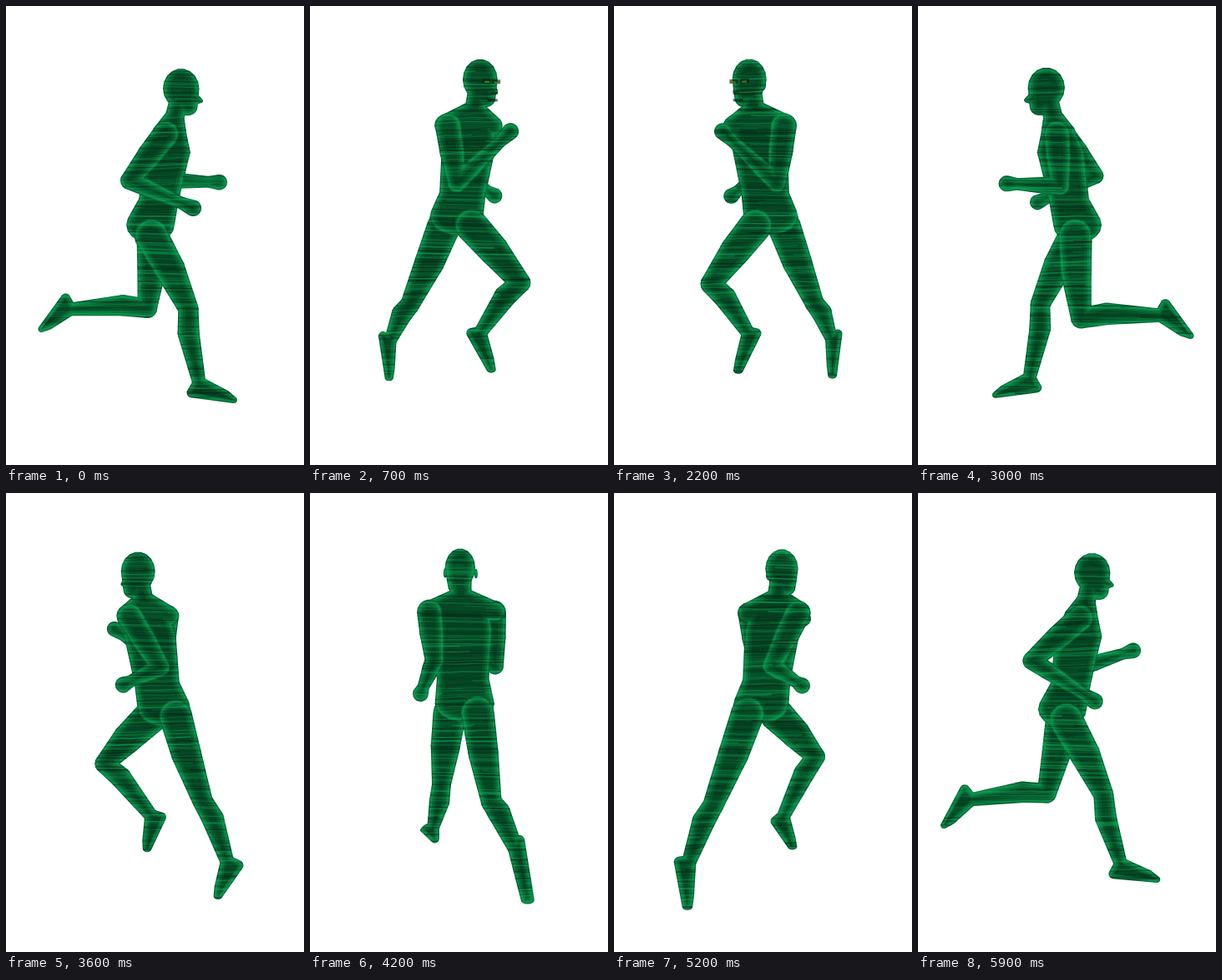
An HTML page with a canvas that plays this animation: 357 by 550 pixels, repeating every 6000 ms.

```html
<!DOCTYPE html>
<html lang="en">
<head>
<meta charset="utf-8">
<title>Runner</title>
<style>
html, body { margin: 0; width: 100%; height: 100%; overflow: hidden; background: #fff; }
canvas { display: block; width: 100%; height: 100%; }
</style>
</head>
<body>
<canvas id="stage" width="357" height="550"></canvas>
<script>
const ctx = document.getElementById('stage').getContext('2d');
const W = 357, H = 550, LOOP = 6000, STRIDE = 3000, STEP = 100;
const AXIS = 182, EYE = 270, CAMERA = 900, PITCH = 0.13;
const TAU = Math.PI * 2;
const wave = (p, peak) => Math.cos(TAU * (p - peak));
const mix = (a, b, k) => a.map((v, i) => v + (b[i] - v) * k);

// Stride phase, then forward/down places of knee, ankle and toe.
const LEG = [
  [0, 36, 90, 49, 179, 90, 199],
  [.12, 3, 96, -25, 182, 20, 205],
  [.233, -69, 95, -111, 149, -113, 197],
  [.31, -58, 98, -136, 136, -158, 184],
  [.4, -35, 94, -131, 120, -163, 162],
  [.467, -26, 95, -118, 98, -150, 128],
  [.5, -13, 98, -107, 97, -142, 121],
  [.62, 40, 80, -42, 108, -62, 142],
  [.733, 75, 54, 20, 120, 37, 160],
  [.82, 67, 68, 68, 146, 104, 170],
  [.9, 48, 88, 98, 156, 139, 170],
  [.967, 39, 90, 60, 174, 104, 194]
];
// Stride phase, then elbow and wrist.
const ARM = [
  [0, -32, -64, 26, -38],
  [.12, -6, -60, 48, -56],
  [.233, 38, -62, 70, -108],
  [.4, 28, -60, 72, -86],
  [.467, 21, -58, 67, -76],
  [.5, 11, -58, 62, -58],
  [.6, -14, -60, 38, -48],
  [.733, -47, -67, 2, -46],
  [.9, -52, -73, 3, -38],
  [.967, -48, -72, 10, -34]
];
const LAYERS = [
  [0, '#056b37'], [1.3, '#0b8d4b'], [3.5, '#077039'], [6, '#05582c'], [9, '#044824']
];

// Smooth cyclic interpolation through the rows of a key table.
function sample(keys, phase) {
  const p = phase - Math.floor(phase), n = keys.length;
  const row = j => {
    const turn = Math.floor(j / n), r = keys[j - turn * n];
    return [r[0] + turn, ...r.slice(1)];
  };
  let i = n - 1;
  while (keys[i][0] > p) i--;
  const [a, b, c, d] = [row(i - 1), row(i), row(i + 1), row(i + 2)];
  const span = c[0] - b[0], u = (p - b[0]) / span, u2 = u * u, u3 = u2 * u;
  return b.slice(1).map((v, k) => {
    const j = k + 1;
    const m0 = (c[j] - a[j]) / (c[0] - a[0]) * span;
    const m1 = (d[j] - b[j]) / (d[0] - b[0]) * span;
    return (2 * u3 - 3 * u2 + 1) * v + (u3 - 2 * u2 + u) * m0
      + (3 * u2 - 2 * u3) * c[j] + (u3 - u2) * m1;
  });
}

let cosA = 1, sinA = 0;

// Points are [forward, down, left].
function project([f, y, l]) {
  const z = f * sinA - l * cosA, s = CAMERA / (CAMERA - z);
  return { x: AXIS + s * (f * cosA + l * sinA), y: EYE + s * (y + PITCH * z), z, s };
}

function blob(point, rf, rl = rf, ry = rf) {
  const b = project(point);
  b.rx = b.s * Math.hypot(rf * cosA, rl * sinA);
  b.ry = b.s * ry;
  return b;
}

function outline(blobs, inset) {
  const pts = [];
  for (const b of blobs) {
    const rx = Math.max(b.rx - inset, 0), ry = Math.max(b.ry - inset, 0);
    for (let i = 0; i < 18; i++) {
      const a = TAU * i / 18;
      pts.push([b.x + rx * Math.cos(a), b.y + ry * Math.sin(a)]);
    }
  }
  pts.sort((p, q) => p[0] - q[0] || p[1] - q[1]);
  const half = list => {
    const h = [];
    for (const p of list) {
      while (h.length > 1) {
        const [a, b] = h.slice(-2);
        if ((b[0] - a[0]) * (p[1] - a[1]) - (b[1] - a[1]) * (p[0] - a[0]) > 0) break;
        h.pop();
      }
      h.push(p);
    }
    return h.slice(0, -1);
  };
  return half(pts).concat(half(pts.slice().reverse()));
}

function drawGroup(group) {
  for (const [inset, colour] of LAYERS) {
    ctx.fillStyle = colour;
    for (const part of group.parts) {
      ctx.beginPath();
      outline(part, inset).forEach(p => ctx.lineTo(p[0], p[1]));
      ctx.fill();
    }
  }
}

const chain = list => list.slice(1).map((b, i) => [list[i], b]);
const depth = list => list.reduce((sum, b) => sum + b.z, 0) / list.length;

function leg(side, p, bob) {
  const [kx, ky, ax, ay, tx, ty] = sample(LEG, p);
  const inner = side * (12 + 4 * wave(p, .4));
  const hip = [-7 + 8 * wave(p, .733), -2 + bob, side * 16];
  const knee = [kx, ky, side * (18 + 7 * wave(p, .45))];
  const ankle = [ax, ay, inner], toe = [tx, ty, inner];
  const mid = mix(hip, knee, .45), calf = mix(knee, ankle, .32);
  mid[0] += 2;
  const shin = Math.hypot(ax - kx, ay - ky), foot = Math.hypot(tx - ax, ty - ay);
  calf[0] -= 4 * (ay - ky) / shin;
  calf[1] += 4 * (ax - kx) / shin;
  const dx = (tx - ax) / foot, dy = (ty - ay) / foot;
  const heel = [ax - 14 * dy - 3 * dx, ay + 14 * dx - 3 * dy, inner];
  const joints = [blob(hip, 20), blob(mid, 18), blob(knee, 12), blob(calf, 13), blob(ankle, 8)];
  const sole = [joints[4], blob(heel, 6), blob(mix(ankle, toe, .75), 7), blob(toe, 4, 7)];
  return { parts: [...chain(joints), sole], z: depth([joints[0], joints[2], joints[4]]) };
}

function arm(side, p, bob, sway) {
  const [ex, ey, wx, wy] = sample(ARM, p);
  const shoulder = [12 + 6 * wave(p, .33), -122 + bob, side * 43 + sway * .7];
  const elbow = [ex, ey, side * 51 + sway * .3];
  const wrist = [wx, wy, side * (30 - 19 * wave(p, .33))];
  const fist = mix(elbow, wrist, 1.25);
  const joints = [blob(shoulder, 15), blob(mix(shoulder, elbow, .45), 14), blob(elbow, 10.5),
    blob(mix(elbow, wrist, .3), 10), blob(wrist, 7), blob(fist, 9.5)];
  return { parts: chain(joints), z: depth([joints[0], joints[2], joints[4]]) };
}

function torso(bob, sway) {
  const at = (f, y, l = 0) => [f, y + bob, l - sway * y / 170];
  const spine = [
    blob(at(-9, -13), 29, 36, 22),
    blob(at(1, -42), 24, 32, 14),
    blob(at(11, -100), 28, 37, 18),
    blob(at(14, -125), 20, 34, 12)
  ];
  const neck = blob(at(20, -142), 11.5, 13);
  const skull = blob(at(28, -177), 22, 18.5, 24);
  const jaw = blob(at(36, -155), 12, 12, 11);
  const shoulders = [43, -43].map(l => blob(at(12, -123, l), 12));
  const face = blob(at(42, -165), 7, 10, 9);
  const nose = blob(at(52, -162), 2.5);
  const parts = [
    ...chain(spine), ...shoulders.map(s => [neck, s, spine[3]]),
    [neck, blob(at(25, -160), 12, 14)], [skull, jaw], [face, nose],
    ...[20, -20].map(l => [blob(at(25, -170, l), 3, 2, 6)])
  ];
  return { parts, z: 0 };
}

function drawFace(bob, sway) {
  if (sinA < .3) return;
  const spot = (f, y, l, w, h, colour) => {
    const p = project([f, y + bob, l - sway * y / 170]);
    ctx.fillStyle = colour;
    ctx.fillRect(p.x - w / 2, p.y - h / 2, w, h);
  };
  for (const l of [-9, 9]) {
    spot(45, -174, l, 10, 5, 'rgba(0,30,14,.6)');
    spot(46, -173, l, 6, 2, '#5c7420');
  }
  spot(50, -160, 0, 8, 3, 'rgba(0,25,12,.55)');
  spot(47, -152, 0, 12, 3, 'rgba(0,25,12,.65)');
}

function noise(seed) {
  return () => {
    seed = (seed + 0x6D2B79F5) | 0;
    let v = Math.imul(seed ^ (seed >>> 15), 1 | seed);
    v = (v + Math.imul(v ^ (v >>> 7), 61 | v)) ^ v;
    return ((v ^ (v >>> 14)) >>> 0) / 4294967296;
  };
}

// Scan lines kept inside the figure.
function drawLines(bob, angle) {
  ctx.save();
  ctx.globalCompositeOperation = 'source-atop';
  const rand = noise(41);
  for (let y = 40; y < 515; y += 1.6) {
    const bright = rand() < .46, strength = rand();
    ctx.strokeStyle = bright
      ? `rgba(12,172,88,${.12 + .5 * strength * strength})`
      : `rgba(0,26,13,${.1 + .45 * strength})`;
    ctx.lineWidth = .6 + 1.3 * rand();
    const shift = rand() * 90 + angle * 30, tilt = 2.5 * Math.sin(y / 37 + angle);
    for (let x = -100 + shift % 90; x < W;) {
      const len = 25 + 85 * rand();
      if (rand() < .75) {
        const yy = y + bob + tilt * (x - AXIS) / 90;
        ctx.beginPath();
        ctx.moveTo(x, yy);
        ctx.quadraticCurveTo(x + len / 2, yy + 1.2, x + len, yy + tilt * len / 90);
        ctx.stroke();
      }
      x += len;
    }
  }
  ctx.restore();
}

function draw(t) {
  const angle = TAU * t / LOOP, phase = t / STRIDE;
  cosA = Math.cos(angle);
  sinA = Math.sin(angle);
  const bob = 9 * wave(2 * phase, .15), sway = 8 * wave(phase, 0);
  ctx.clearRect(0, 0, W, H);
  const groups = [
    torso(bob, sway),
    leg(-1, phase, bob), leg(1, phase + .5, bob),
    arm(-1, phase, bob, sway), arm(1, phase + .5, bob, sway)
  ];
  groups.sort((a, b) => a.z - b.z).forEach(drawGroup);
  drawLines(bob, angle);
  drawFace(bob, sway);
}

const start = performance.now();
function tick() {
  const t = Math.max(0, performance.now() - start) % LOOP;
  draw(Math.floor(t / STEP) * STEP);
  requestAnimationFrame(tick);
}
tick();
</script>
</body>
</html>
```
